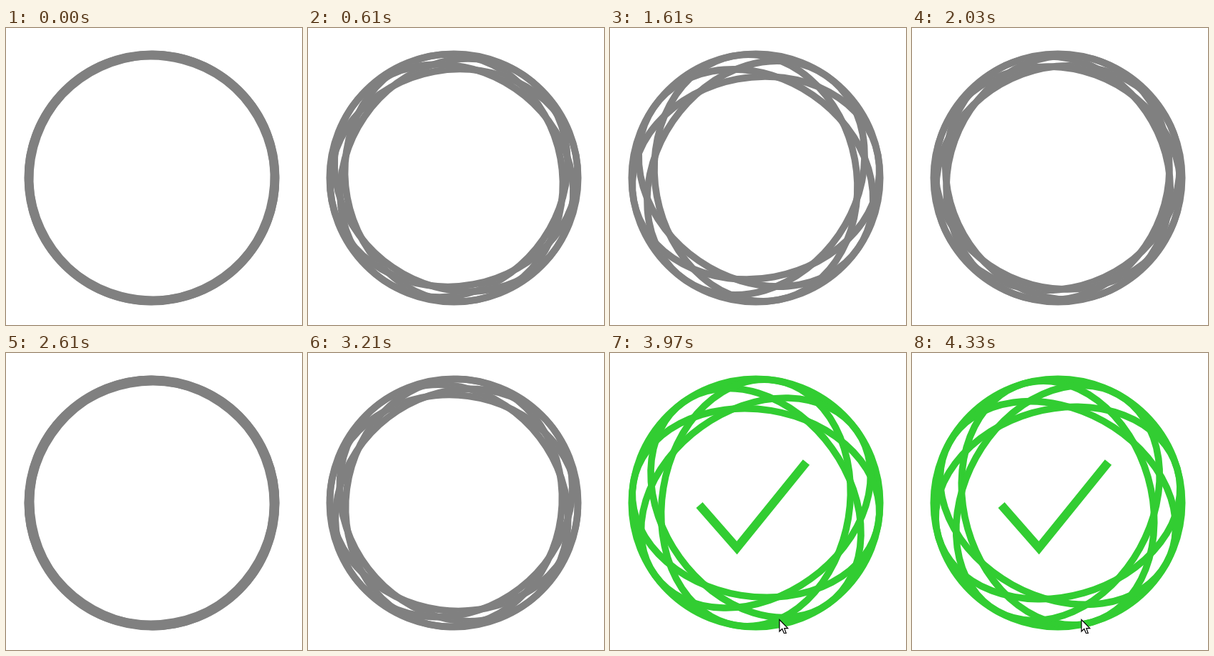
Recreate the animation shown at these times as an HTML page with a canvas. Size 414x416 px, loop 4.39 s.

```html
<!DOCTYPE html>
<html lang="en">
<head>
<meta charset="utf-8">
<title>Loader</title>
<style>
  html, body { margin: 0; width: 100%; height: 100%; overflow: hidden; background: #fff; }
  canvas { display: block; }
</style>
</head>
<body>
<canvas id="stage" width="414" height="416"></canvas>
<script>
const ctx = document.getElementById("stage").getContext("2d");

const LOOP = 4390;
const CX = 204, CY = 210;
const RINGS = 4;
const RX = 173.7, RY = 170.1, LINE = 9.6;
const PERIOD = 2580;      // one flattening and return
const TURN = 2000;        // one full rotation
const DEPTH = 39;         // how far the rings flatten
const DONE = 3400;        // loading turns into success
const GRAY = [128, 128, 128], GREEN = [50, 205, 50];

const clamp = v => Math.min(1, Math.max(0, v));
const ease = v => v * v * (3 - 2 * v);
const ramp = (t, from, to) => ease(clamp((t - from) / (to - from)));
const mix = (a, b, k) => a + (b - a) * k;
const rgb = k => `rgb(${GRAY.map((c, i) => Math.round(mix(c, GREEN[i], k))).join()})`;

// linear there and back while loading, fully flattened after success
function flattening(t) {
  const wave = 1 - Math.abs(1 - 2 * (t % PERIOD) / PERIOD);
  return DEPTH * mix(wave, 1, ramp(t, DONE, DONE + 200));
}

function ring(ry, angle) {
  ctx.beginPath();
  ctx.ellipse(CX, CY, RX, ry, angle, 0, 2 * Math.PI);
  ctx.stroke();
}

function drawRings(t) {
  const spin = t / TURN * 2 * Math.PI - 30.5 * Math.PI / 180;
  const ry = RY - flattening(t);
  ctx.strokeStyle = rgb(ramp(t, DONE, DONE + 200));
  ctx.lineWidth = LINE;
  ring(RX, 0);
  for (let i = 0; i < RINGS; i++) ring(ry, spin + i * Math.PI / RINGS);
}

function drawCheck(t) {
  const alpha = ramp(t, DONE, DONE + 290);
  if (!alpha) return;
  ctx.save();
  ctx.globalAlpha = alpha;
  ctx.strokeStyle = rgb(1);
  ctx.lineWidth = 12;
  ctx.lineJoin = "miter";
  ctx.beginPath();
  ctx.moveTo(125, 213);
  ctx.lineTo(177.5, 273);
  ctx.lineTo(274.5, 153);
  ctx.stroke();
  ctx.restore();
}

const arrow = new Path2D("M0 0V16.5L3.8 12.9L6.4 19H9.3L6.9 12.2H11.8Z");

function drawCursor(t) {
  if (t < 3500) return;
  const k = ramp(t, 3640, 3890);
  ctx.save();
  ctx.translate(mix(190.5, 237, k), mix(264, 373.5, k));
  ctx.fillStyle = "#fff";
  ctx.strokeStyle = "#000";
  ctx.lineWidth = 1.2;
  ctx.fill(arrow);
  ctx.stroke(arrow);
  ctx.restore();
}

const start = performance.now();

function frame() {
  const t = (performance.now() - start) % LOOP;
  ctx.fillStyle = "#fff";
  ctx.fillRect(0, 0, 414, 416);
  drawRings(t);
  drawCheck(t);
  drawCursor(t);
  requestAnimationFrame(frame);
}
frame();
</script>
</body>
</html>
```
